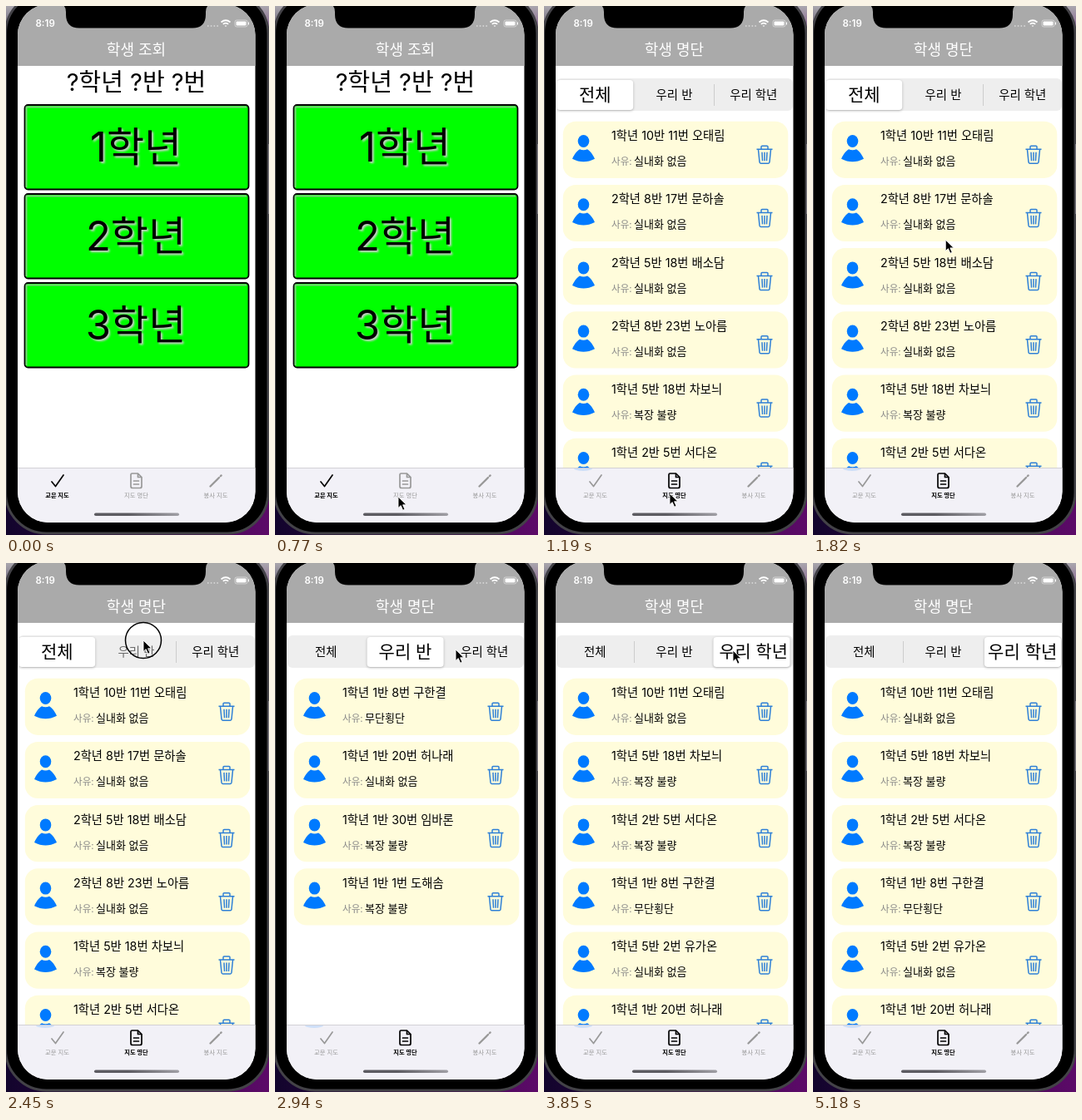
Write an HTML page that moves like this. It is 316 by 636 pixels and loops after 5250 ms.

```html
<!DOCTYPE html>
<html lang="ko">
<head>
<meta charset="utf-8">
<style>
  html, body { margin: 0; width: 100%; height: 100%; overflow: hidden; background: #000; }
  svg { display: block; width: 316px; height: 636px; font-family: Inter, "Noto Sans CJK KR", sans-serif; }
  .mid { text-anchor: middle; }
  .tab { color: #999; font-size: 7.3px; }
  .tab text { fill: currentColor; }
  .tab path { fill: none; stroke: currentColor; stroke-width: 1.7; stroke-linejoin: round; stroke-linecap: round; }
  .tab.on { color: #000; font-weight: 700; }
  .emboss { filter: drop-shadow(2px 2px 1px #ccc); }
  .pill { filter: drop-shadow(0 1px 1.5px #0004); }
</style>
</head>
<body>
<svg viewBox="0 0 316 636">
  <defs>
    <linearGradient id="desk"><stop stop-color="#12042c"/><stop offset="1" stop-color="#5c0a68"/></linearGradient>
    <linearGradient id="sky" x2="0" y2="1">
      <stop stop-color="#aaa7ae"/><stop offset=".1" stop-color="#aaa7ae" stop-opacity="0"/>
    </linearGradient>
    <linearGradient id="bar"><stop offset=".4" stop-color="#5c5b61"/><stop offset="1" stop-color="#a09fa5"/></linearGradient>
    <clipPath id="screen"><rect x="14" y="-2" width="285.500" height="623" rx="37"/></clipPath>
    <clipPath id="tabArea"><rect x="14" y="556" width="286" height="8"/></clipPath>
    <g id="person" fill="#007aff">
      <ellipse cx="47.500" cy="23.800" rx="6.800" ry="7.500"/>
      <path d="M34 45C37 38 41 34.500 43 33.500Q47.500 35.500 52 33.500C54 34.500 58 38 61 45Q54 48.500 47.500 48.500T34 45Z"/>
    </g>
    <path id="trash" fill="none" stroke="#2f80d6" stroke-width="1.500" stroke-linejoin="round"
      d="M255.500 33.500H274.500M261 33V30.500Q261 29.500 262 29.500H268Q269 29.500 269 30.500V33M257.500 34L259 49Q259.200 50.500 260.500 50.500H269.500Q270.800 50.500 271 49L272.500 34M262 37L262.500 47.500M265 37V47.500M268 37L267.500 47.500"/>
  </defs>

  <rect width="316" height="636" fill="url(#desk)"/>
  <rect width="316" height="636" fill="url(#sky)"/>
  <rect x="-.5" y="-16" width="315.500" height="650" rx="49" fill="#000" stroke="#434247" stroke-width="3"/>
  <path d="M315.500 166V250" stroke="#77757c"/>

  <g clip-path="url(#screen)">
    <rect x="14" y="-2" width="286" height="623" fill="#fff"/>
    <g id="home"></g>
    <g id="roster">
      <rect x="15" y="87" width="284" height="39" rx="6" fill="#eee"/>
      <path id="divider0" d="M108.500 94V120" stroke="#ccc"/>
      <path id="divider1" d="M204.500 94V120" stroke="#ccc"/>
      <rect id="pill" class="pill" y="89" width="92" height="36" rx="4" fill="#fff"/>
      <g id="segments" class="mid"></g>
      <g id="lists"></g>
    </g>

    <rect x="14" y="-2" width="286" height="74" fill="#aaa"/>
    <text id="title" class="mid" x="156.500" y="58.500" font-size="18" fill="#fff"></text>

    <rect x="14" y="555.500" width="286" height="66" fill="#f2f1f7"/>
    <path d="M14 555.500H300" stroke="#c9c8ce" stroke-width=".8"/>
    <ellipse id="glow" cx="47" cy="556" rx="11" ry="3" fill="#007aff" opacity=".15" clip-path="url(#tabArea)"/>
    <g class="tab mid"><path d="M55 572L59.500 577.500L69 564"/><text x="61.500" y="590.500">교문 지도</text></g>
    <g class="tab mid">
      <path d="M151.500 562H158.500L163 566.500V577.500Q163 579.500 161 579.500H152Q150 579.500 150 577.500V563.500Q150 562 151.500 562ZM158.500 562V566.500H163M153.500 571H159.500M153.500 575H159.500"/>
      <text x="156.500" y="590.500">지도 명단</text>
    </g>
    <g class="tab mid">
      <path d="M245.500 577.500L248 575L256 567M257.800 565.200L258.600 564.400" style="stroke-width:2.300"/>
      <text x="252" y="590.500">봉사 지도</text>
    </g>
    <rect x="106" y="609.500" width="102" height="3.500" rx="1.750" fill="url(#bar)"/>
  </g>

  <path d="M67 -2Q72 0 72 7V10Q72 26.500 88 26.500H224Q240 26.500 240 10V7Q240 0 245 -2Z"/>
  <text x="35.500" y="25" font-size="11.500" font-weight="600" fill="#fff">8:19</text>
  <path d="M242 24H255" stroke="#ddd" stroke-width="1.500" stroke-dasharray="1.500 2.300"/>
  <g fill="none" stroke="#fff">
    <path d="M258.500 19.500Q264 15 269.500 19.500M260.800 21.800Q264 19.300 267.200 21.800" stroke-width="1.700"/>
    <path d="M262.500 23.500H265.500L264 25Z" fill="#fff" stroke="none"/>
    <rect x="275" y="17" width="15" height="8" rx="2.200" stroke="#ddd" stroke-width=".8"/>
    <rect x="276.500" y="18.500" width="12" height="5" rx="1" fill="#fff" stroke="none"/>
    <path d="M291.500 19.500V22.500"/>
  </g>

  <g id="cursor">
    <circle id="ring" r="21.500" fill="none" stroke="#000" stroke-width="1.500"/>
    <path d="M0 0V13.500L3.200 10.600L5.600 16.200L8 15.200L5.600 9.800H10Z" stroke="#fff" stroke-width=".9"/>
  </g>
</svg>
<script>
const $ = id => document.getElementById(id);
const set = (el, attrs) => { for (const k in attrs) el.setAttribute(k, attrs[k]); };
const show = (el, on) => { el.style.display = on ? '' : 'none'; };

const LOOP = 5250, OPEN_LIST = 1190, PICK = [2520, 3640], SLIDE = 300;
const PRESSES = [[910, 1160], [2310, 2520], [3430, 3640]];
// Pointer path: time, x, y
const PATH = [
  [210, 318, 638], [420, 215, 610], [630, 150, 592], [770, 148, 590], [1100, 151, 586],
  [1500, 151, 586], [1640, 152, 520], [1890, 162, 190], [2030, 165, 101], [2240, 165, 93],
  [2610, 165, 93], [2770, 197, 100], [2940, 217, 104], [3220, 226, 105], [3850, 227, 105],
  [3930, 227, 106], [4060, 236, 150], [4200, 232, 280], [4340, 205, 460], [4480, 176, 640]
];
const SEGMENTS = ['전체', '우리 반', '우리 학년'];
const SHOES = '실내화 없음', DRESS = '복장 불량', CROSS = '무단횡단';
const a = ['1학년 10반 11번 오태림', SHOES], b = ['1학년 5반 18번 차보늬', DRESS],
  c = ['1학년 2반 5번 서다온', DRESS], d = ['1학년 1반 8번 구한결', CROSS],
  e = ['1학년 1반 20번 허나래', SHOES];
const LISTS = [
  [a, ['2학년 8반 17번 문하솔', SHOES], ['2학년 5반 18번 배소담', SHOES],
    ['2학년 8반 23번 노아름', SHOES], b, c],
  [d, e, ['1학년 1반 30번 임바론', DRESS], ['1학년 1반 1번 도해솜', DRESS]],
  [a, b, c, d, ['1학년 5반 2번 유가온', SHOES], e]
];

const row = ([name, reason], i) => `<g transform="translate(0 ${138.7 + i * 76.2})">
  <rect x="22.800" width="270.500" height="68.200" rx="15.500" fill="#fffcdb"/>
  <use href="#person"/><use href="#trash"/>
  <text x="81" y="22.500" font-size="14.300">${name}</text>
  <text x="81" y="52.500" font-size="11.600" fill="#888">사유:</text>
  <text x="108" y="52.500" font-size="13">${reason}</text></g>`;
const gradeButton = (n, i) => {
  const y = 119 + i * 107;
  return `<rect x="22.500" y="${y}" width="269" height="101.500" rx="4" fill="#0f0" stroke="#000" stroke-width="1.800"/>
  <path d="M24.500 ${y + 99}V${y + 2.5}H289" fill="none" stroke="#bbb" stroke-width="2" opacity=".65"/>
  <text class="mid emboss" x="156" y="${y + 68}" font-size="49">${n}학년</text>`;
};

$('home').innerHTML = '<text class="mid" x="156.500" y="101.500" font-size="29">?학년 ?반 ?번</text>' +
  [1, 2, 3].map(gradeButton).join('');
$('lists').innerHTML = LISTS.map(list => `<g>${list.map(row).join('')}</g>`).join('');
$('segments').innerHTML = SEGMENTS.map(s => `<text>${s}</text>`).join('');
const tabs = document.querySelectorAll('.tab');

function pointerAt(t) {
  const i = PATH.findIndex(p => p[0] > t);
  if (i < 1) return null;
  const [t0, x0, y0] = PATH[i - 1], [t1, x1, y1] = PATH[i], k = (t - t0) / (t1 - t0);
  return [x0 + (x1 - x0) * k, y0 + (y1 - y0) * k];
}

const easeOut = (t, start) => 1 - (1 - Math.min(1, Math.max(0, (t - start) / SLIDE))) ** 3;

function draw(t) {
  const listOpen = t >= OPEN_LIST;
  show($('home'), !listOpen);
  show($('roster'), listOpen);
  show($('glow'), listOpen);
  $('title').textContent = listOpen ? '학생 명단' : '학생 조회';
  tabs.forEach((tab, i) => tab.classList.toggle('on', i === +listOpen));

  const picked = PICK.filter(p => t >= p).length;
  const pos = easeOut(t, PICK[0]) + easeOut(t, PICK[1]);
  const press = PRESSES.findIndex(([from, to]) => t >= from && t < to);
  set($('pill'), { x: 15.2 + 95.4 * pos });
  show($('divider0'), picked === 2);
  show($('divider1'), picked === 0);
  [...$('segments').children].forEach((label, i) => {
    const size = 14.4 + 6.6 * Math.max(0, 1 - Math.abs(pos - i));
    set(label, { x: 61.3 + 95.2 * i, y: 106.5 + size * .36, 'font-size': size, opacity: i && press === i ? .55 : 1 });
  });
  [...$('lists').children].forEach((list, i) => show(list, i === picked));

  const at = pointerAt(t);
  show($('cursor'), at);
  if (at) set($('cursor'), { transform: `translate(${at})` });
  show($('ring'), press >= 0);
}

function tick() {
  draw(performance.now() % LOOP);
  requestAnimationFrame(tick);
}
tick();
</script>
</body>
</html>
```
